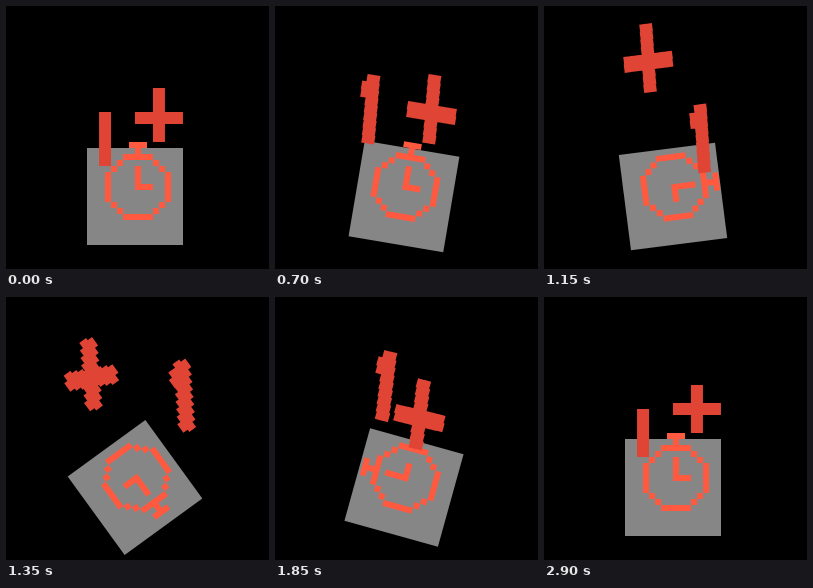
An HTML page with a canvas that plays this animation: 263x263 px, repeating every 3.7 s.

```html
<!DOCTYPE html>
<html lang="en">
<head>
<meta charset="utf-8">
<title>Stopwatch bonus</title>
<style>
html, body { margin: 0; width: 100%; height: 100%; overflow: hidden; background: #000; }
canvas { display: block; }
</style>
</head>
<body>
<canvas id="stage" width="263" height="263"></canvas>
<script>
const LOOP = 3700, STEP = 50, CELL = 6;
const GREY = '#868686', CORAL = '#ff5a40', RED = '#e04434';
const pen = document.getElementById('stage').getContext('2d');

// Key poses: time, clockwise turn, anticlockwise orbit of the text, its radius
const poses = [
  [450, 0, 24, 29.5],
  [700, 9.6, 0, 30.5],
  [1150, 82.7, 124, 48.5],
  [1550, 210.7, 213, 42],
  [1850, 285.5, 320, 22],
  [2250, 353.5, 385, 28],
  [2600, 360, 384, 29.5]
];

const clamp = v => Math.min(1, Math.max(0, v));
const ramp = (t, from, to) => clamp((t - from) / (to - from));
const smooth = u => u * u * (3 - 2 * u);
const rad = deg => deg * Math.PI / 180;

// Smooth curve through one column of the poses, at rest at both ends
function follow(t, col) {
  const end = poses.length - 1;
  let i = 0;
  while (i < end - 1 && t >= poses[i + 1][0]) i++;
  const a = poses[i], b = poses[i + 1], span = b[0] - a[0];
  const u = ramp(t, a[0], b[0]), w = 1 - u;
  const slope = j => {
    if (j === 0 || j === end) return 0;
    const p = poses[j - 1], q = poses[j + 1];
    return (q[col] - p[col]) / (q[0] - p[0]);
  };
  return a[col] * (1 + 2 * u) * w * w + b[col] * u * u * (3 - 2 * u) +
    span * (slope(i) * u * w * w - slope(i + 1) * u * u * w);
}

function clockPath() {
  const p = new Path2D();
  const cell = (col, row, w = 1, h = 1) =>
    p.rect((col - 5.5) * CELL, (row - 5.5) * CELL, w * CELL, h * CELL);
  cell(4, -2, 3);
  cell(5, -1);
  for (const edge of [0, 10]) {
    cell(3, edge, 5);
    cell(edge, 3, 1, 5);
  }
  for (const n of [1, 2]) {
    for (const row of [n, 10 - n]) {
      cell(3 - n, row);
      cell(7 + n, row);
    }
  }
  cell(5, 2, 1, 4);
  cell(6, 5, 2);
  return p;
}
const clock = clockPath();

function spin(x, y, angle, draw) {
  pen.save();
  pen.translate(x, y);
  pen.rotate(rad(angle));
  draw();
  pen.restore();
}

// A glyph is a sheared, stretched grid whose cells turn on the spot
function glyph(x, y, look, isPlus) {
  const { lift, grow, turn } = look;
  const tilt = rad(turn - 90 * Math.round(turn / 90));
  const cover = Math.cos(tilt) + Math.abs(Math.sin(tilt));
  const shear = 0.27 * Math.sin(rad(turn * 4));
  const stretch = 1 + 0.25 * lift;

  pen.beginPath();
  const cell = (col, row, height = 1) => {
    const dx = (col + 0.5) * CELL, dy = (row + 1 - height / 2) * CELL * stretch;
    const w = CELL * cover, h = CELL * stretch * height * cover;
    pen.save();
    pen.translate(x + dx - dy * shear * 0.5, y + dy + dx * shear);
    pen.rotate(tilt);
    pen.rect(-w / 2, -h / 2, w, h);
    pen.restore();
  };
  for (const col of [-1, 0]) {
    cell(col, -5, grow);
    for (let row = -4; row < 4; row++) cell(col, row);
  }
  if (isPlus) {
    for (let col = -4; col < 4; col++) {
      cell(col, -1);
      cell(col, 0);
    }
  } else {
    cell(-1 - lift * 0.8, -4);
    cell(-1 - lift * 0.8, -3);
  }
  pen.fill();
}

function render(t) {
  const [turn, orbit, radius] = [1, 2, 3].map(col => follow(t, col));
  const lift = smooth(ramp(t, 50, 600)) * (1 - smooth(ramp(t, 2200, 2600)));
  const grow = 1 - ramp(t, 2700, 2900);
  const hop = Math.exp(-(((t - 1270) / 155) ** 2));

  pen.fillStyle = '#000';
  pen.fillRect(0, 0, 263, 263);
  pen.fillStyle = GREY;
  spin(129, 190.5, turn, () => pen.fillRect(-48, -48.5, 96, 97));
  pen.fillStyle = CORAL;
  spin(132 - 1.5 * lift, 181, turn, () => pen.fill(clock));

  const look = { lift, grow, turn };
  const midX = 126 + 6 * Math.sin(Math.PI * ramp(t, 700, 1950));
  const midY = 124 - 17 * lift - 20 * hop;
  const dx = radius * Math.cos(rad(orbit)), dy = -radius * Math.sin(rad(orbit));
  pen.fillStyle = RED;
  glyph(midX - dx, midY - dy, look, false);
  glyph(midX + dx, midY + dy, look, true);
}

const start = performance.now();
let last = -1;
function tick() {
  const now = Math.max(0, performance.now() - start) % LOOP;
  const t = Math.floor(now / STEP) * STEP;
  if (t !== last) render(last = t);
  requestAnimationFrame(tick);
}
tick();
</script>
</body>
</html>
```
